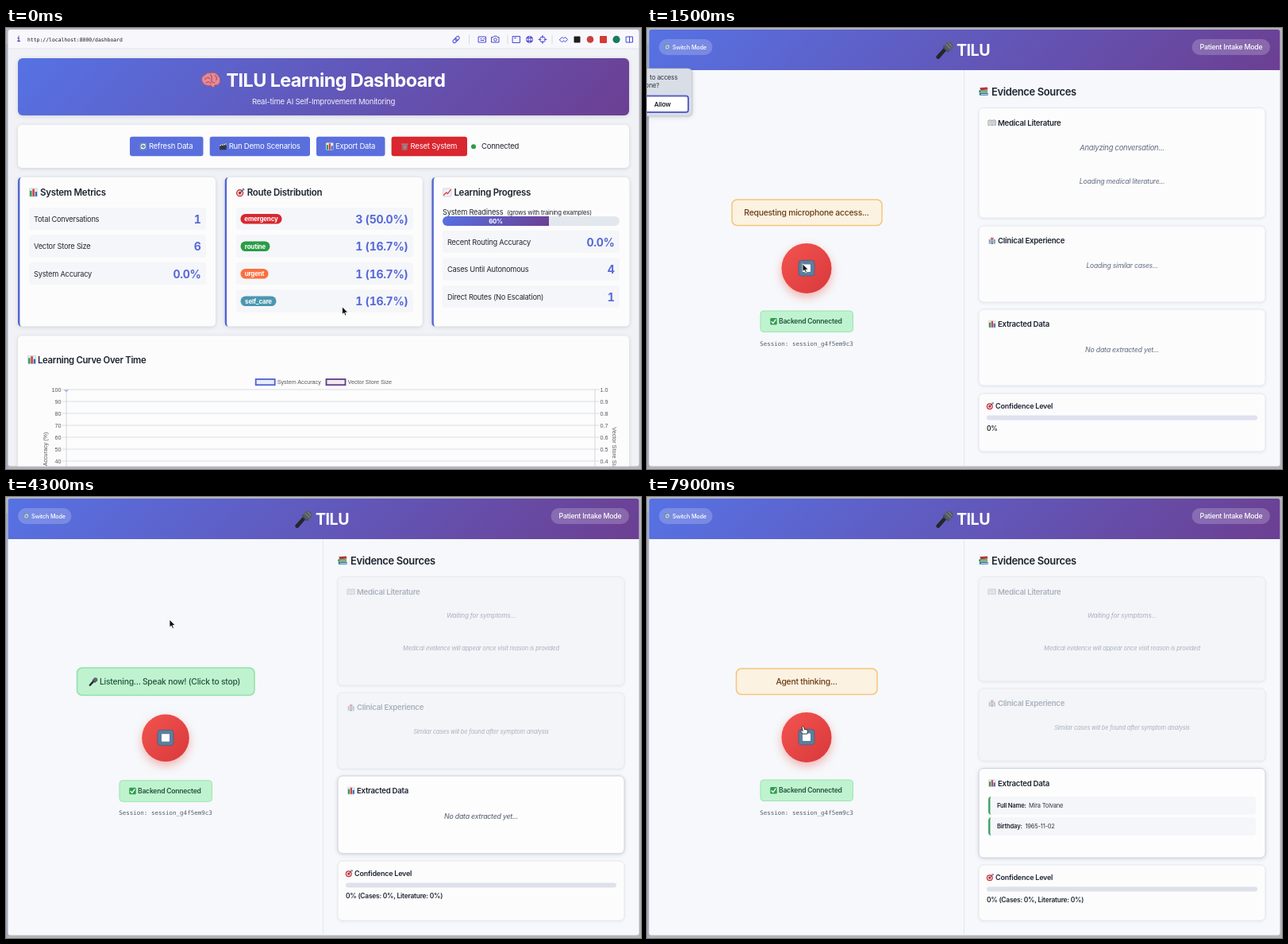
Write an HTML page that moves like this. It is 800x555 px and loops after 8000 ms.

```html
<!DOCTYPE html>
<html lang="en">
<head>
<meta charset="utf-8">
<title>Dashboard tour</title>
<style>
html, body { margin: 0; width: 100%; height: 100%; overflow: hidden; background: #b4b5ba; }
svg { display: block; width: 800px; height: 555px; }
text { font-family: Inter, sans-serif; letter-spacing: -.025em; white-space: pre; }
.chart text { font-family: "Liberation Sans", Arial, sans-serif; letter-spacing: 0; }
.mono { font-family: "DejaVu Sans Mono", monospace; letter-spacing: 0; }
.num { font-variant-numeric: tabular-nums; }
.b { font-weight: 700; }
.s { font-weight: 600; }
.m { font-weight: 500; }
.i { font-style: italic; }
.mid { text-anchor: middle; }
.end { text-anchor: end; }
.card { filter: drop-shadow(0 1.5px 2.5px rgba(30, 35, 60, .16)); }
.soft { filter: drop-shadow(0 1px 1.5px rgba(30, 35, 60, .08)); }
.glow { filter: drop-shadow(0 5px 6px rgba(235, 70, 60, .38)); }
</style>
</head>
<body>
<svg id="stage" viewBox="0 0 800 555" xmlns="http://www.w3.org/2000/svg"></svg>
<script>
const LOOP = 8000, STEP = 100, SCROLL = 599;
const INK = '#23272f', DARK = '#1d2430', BLUE = '#5569d8', MUTED = '#5f6b7d', PALE = '#a8b1bf', AXIS = '#595959';

const rect = (x, y, w, h, r, fill, more = '') =>
  `<rect x="${x}" y="${y}" width="${w}" height="${h}" rx="${r}" fill="${fill}" ${more}/>`;
const circle = (x, y, r, fill, more = '') =>
  `<circle cx="${x}" cy="${y}" r="${r}" fill="${fill}" ${more}/>`;
const path = (d, fill, stroke = 'none', width = 1) =>
  `<path d="${d}" fill="${fill}" stroke="${stroke}" stroke-width="${width}" stroke-linecap="round" stroke-linejoin="round"/>`;
// y is the middle of the capitals
const text = (x, y, str, size = 9.58, fill = INK, cls = '') =>
  `<text x="${x}" y="${y + size * .36}" font-size="${size}" fill="${fill}" class="${cls}">${str}</text>`;
// Coloured left border that tapers into the rounded corners
const edge = (x, y, h, w, r, fill) =>
  path(`M${x + r} ${y}Q${x} ${y} ${x} ${y + r}V${y + h - r}Q${x} ${y + h} ${x + r} ${y + h}` +
    `Q${x + w} ${y + h} ${x + w} ${y + h - r}V${y + r}Q${x + w} ${y} ${x + r} ${y}z`, fill);

// CSS-like 135 degree gradient across a box
function diagonal(id, x, y, w, h, from, to) {
  const cx = x + w / 2, cy = y + h / 2, d = (w + h) / 4;
  return `<linearGradient id="${id}" gradientUnits="userSpaceOnUse" x1="${cx - d}" y1="${cy - d}" x2="${cx + d}" y2="${cy + d}">
    <stop stop-color="${from}"/><stop offset="1" stop-color="${to}"/></linearGradient>`;
}

// Icons live on a 10 x 10 grid
const ICONS = {
  chart: rect(.3, .3, 9.4, 9.4, .8, '#e6ebee', 'stroke="#bcc6cc" stroke-width=".5"') + rect(1, 3, 2.2, 6.4, 0, '#2f9e4f') +
    rect(4, 1, 2.2, 8.4, 0, '#d5383c') + rect(7, 4.2, 2.2, 5.2, 0, '#2f6fc4'),
  trend: rect(.3, .3, 9.4, 9.4, .8, '#eef1f4', 'stroke="#b9c2cc" stroke-width=".5"') +
    path('M1 8L4 5L5.5 6.5L9 1.8', 'none', '#d5383c', 1.1),
  target: circle(4.5, 5.6, 4.2, '#cf2f36') + circle(4.5, 5.6, 2.9, '#f4eeee') +
    circle(4.5, 5.6, 1.7, '#cf2f36') + path('M4.5 5.6L9 1', 'none', '#35506e', 1) + path('M8 .4V2h1.7', 'none', '#5d86b8', 1),
  mic: path('M.8 9.3L5.2 4.4', 'none', '#23262c', 2.3) + path('M4.6 3.2L6.8 5.4', 'none', '#4b4f57', 1.8) +
    circle(7.3, 2.7, 2.5, '#565b62') + path('M5.8 1.8L8.2 4.2M7.2 .9L9 2.9', 'none', '#9aa0a8', .4),
  books: rect(.6, 6.8, 8.8, 2.4, .6, '#2e6fae') + rect(.2, 4, 8.6, 2.5, .6, '#358a4c') +
    path('M1 1.6L8.5 .9L9.2 3.3L1.8 3.9z', '#b5353a') + path('M2.5 8.2h6.4M2 5.4h6.2', 'none', '#e9e4d6', .7),
  book: path('M.3 2Q3 1 5 2.2Q7 1 9.7 2V8.4Q7 7.4 5 8.6Q3 7.4 .3 8.4z', '#e9e7e2', '#6d7b8d', .7) +
    path('M5 2.4V8.3M1.7 3.7h2M1.7 5.3h2M6.3 3.7h2M6.3 5.3h2', 'none', '#8b96a5', .5),
  hospital: rect(.6, 3, 8.8, 6.6, .3, '#a9b6c4') + rect(2.6, .5, 4.8, 9.1, .3, '#c9d1da') +
    path('M5 1.3v2.8M3.6 2.7h2.8', 'none', '#d5383c', 1) + rect(4, 7, 2, 2.6, 0, '#5a6c80') +
    path('M1.5 5h.5M1.5 7h.5M8 5h.5M8 7h.5M3.6 5.6h2.8', 'none', '#56718e', .9),
  check: rect(.3, .3, 9.4, 9.4, 1.5, '#2f9e4f') + path('M2.3 5.4L4.3 7.5L7.8 2.5', 'none', '#fff', 1.5),
  refresh: rect(.3, .3, 9.4, 9.4, 1.6, '#6f8fb3') + path('M2.2 5A2.8 2.8 0 0 1 7 3M7.8 5A2.8 2.8 0 0 1 3 7', 'none', '#fff', 1.1) +
    path('M7.7 1.6V4H5.3zM2.3 8.4V6H4.7z', '#fff'),
  clapper: rect(.5, 3.6, 9, 5.9, .6, '#33373f') + path('M.5 3.2L9 .8L9.5 2.4L.9 4.6z', '#e7e7e7') +
    path('M2.4 2.8l1 1M5 2.1l1 1M7.4 1.4l1 1', 'none', '#222', .9),
  bin: path('M1.5 2.4h7L7.8 9.6H2.2z', '#84656f', '#b48d96', .5) + path('M1 1.8h8M3.6 4v4M5 4v4M6.4 4v4', 'none', '#c5a3aa', .7),
  clock: circle(5, 5, 4.5, '#eceef0', 'stroke="#6d747d" stroke-width="1"') + path('M5 2.2V5H7.6', 'none', '#333', .9),
  cabinet: rect(1, .2, 8, 9.6, .5, '#4a5057') + path('M2 3.3h6M2 6.5h6', 'none', '#8c939b', .5) +
    path('M4.2 1.8h1.6M4.2 5h1.6M4.2 8.2h1.6', 'none', '#d6dade', .8),
  brain: path('M.4 5.6Q-.2 3.5 1.6 2.6Q3 .9 5 1.3Q7.4 .7 8.6 2.4Q10.4 4 9.8 6Q9.2 7.8 7.2 7.6L6.4 9L5 7.8Q1.6 8.4 .4 5.6z', '#e58b96', '#b8586a', .4) +
    path('M2 4.6Q3.2 3 4.4 4.2M4.8 2.2Q6 3 5.4 4.6T7 6.4M7.2 2.6Q8.6 3.6 7.8 5M2.6 6.4Q4 5.4 5 6.8', 'none', '#b8586a', .6)
};
const icon = (name, x, y, size) =>
  `<g transform="translate(${x} ${y - size / 2}) scale(${size / 10})">${ICONS[name]}</g>`;

const PILL = { emergency: ['#d8272f', 52], routine: ['#2a9d45', 37], urgent: ['#fb7040', 35], self_care: ['#4a98b0', 45] };
function pill(x, y, kind) {
  const [fill, w] = PILL[kind];
  return rect(x, y - 6.3, w, 12.6, 6.3, fill) + text(x + w / 2, y, kind, 8, '#fff', 'b mid');
}

const panel = (x, y, w, h) => rect(x, y, w, h, 5, '#fcfcfd', 'class="card"');
const row = (x, y, label, value) =>
  rect(x, y, 223, 28, 3, '#f5f6f9') + label + text(x + 216.5, y + 14.6, value, 14.1, BLUE, 'b num end');
const labelled = (x, y, label, value) => row(x, y, text(x + 6, y + 14.3, label, 9.25), value);

function metricCard(x, iconName, title) {
  return panel(x, 188, 249, 187.5) + edge(x, 188, 187.5, 2.4, 5, '#5064cf') +
    icon(iconName, x + 14, 207, 11) + text(x + 28, 207, title, 11.5, DARK, 's');
}

function button(x, w, iconName, label, fill = '#5a6fdd') {
  return rect(x, 136.7, w, 24.6, 3, fill) + icon(iconName, x + 12, 149, 9.5) + text(x + 24, 149, label, 9.55, '#fff');
}

function chart() {
  let out = '';
  for (let k = 0; k <= 10; k++) {
    const y = 455 + k * 15;
    out += path(`M71 ${y}H747`, 'none', '#d0d6dc', .8) +
      text(69.5, y, 100 - k * 10, 7.2, AXIS, 'end') + text(748.5, y, (1 - k / 10).toFixed(1), 7.2, AXIS);
  }
  const key = (x, stroke, fill, label) =>
    rect(x, 442, 24, 7.2, 0, fill, `stroke="${stroke}" stroke-width="1.8"`) + text(x + 27, 445.7, label, 7.2, AXIS);
  return `<g class="chart">${out}
    ${path('M76 455V610M742 455V610', 'none', '#c9ced6', .8)}
    ${path('M74 455.5Q76 459 78 455.5', '#dfe4fb', '#5064cf', .8)}
    ${key(314.7, '#4f63d2', '#e8ebfa', 'System Accuracy')}${key(403.5, '#5f3d8f', '#f2e8ee', 'Vector Store Size')}
    <g transform="translate(49 530) rotate(-90)">${text(0, 0, 'Accuracy (%)', 7.2, AXIS, 'mid')}</g>
    <g transform="translate(767 530) rotate(90)">${text(0, 0, 'Vector Store Size', 7.2, AXIS, 'mid')}</g>
    ${text(76, 633, '2025-08-10T18:25:17.294622', 7.2, AXIS, 'mid')}</g>`;
}

const CASES = [
  ['emergency', '18:25:17', 'Nadia Folkern, born March 3rd, 1985, presents with severe chest pain of sudden onset one hour ago. No regular medications, allergies, or medical conditions',
    'reported. Key symptoms include severe chest pain, indicating potential cardiac issues. Duration of symptoms is one hour. No associated symptoms mentioned. Immediate',
    'medical evaluation is warranted to assess for potential cardiac events.'],
  ['emergency', '18:47:02', "I'm having severe chest pain that started 30 minutes ago | The pain is 9/10, crushing, radiating to my left arm with shortness of breath"],
  ['routine', '18:47:03', "I'm here for my yearly physical exam | No specific symptoms, just routine preventive care"],
  ['urgent', '18:47:03', "I've had a fever of 103°F for 2 days with severe headache | The fever is 8/10 severity, started suddenly, with chills and body aches"],
  ['emergency', '18:47:03', "I suddenly can't speak clearly and my face feels droopy | Started 10 minutes ago, sudden onset, left side weakness, 10/10 concern"],
  ['self_care', '18:47:03', 'I have a runny nose and mild cough for 2 days | Symptoms are 2/10 severity, typical cold symptoms, no fever']
];
function caseBox([kind, time, first, ...rest], n) {
  const y = SCROLL + (n ? 225 + n * 51 : 202), h = n ? 47 : 69.5, last = y + h - 11.3;
  return rect(27, y, 746, h, 3, '#f5f6f9', 'stroke="#dfe3e9" stroke-width="1"') +
    text(33, y + 12, `Case ${n + 1}:`, 9.7, INK, 'b') + pill(n ? 70 : 68.5, y + 12, kind) +
    text(33, y + 24.3, 'Symptoms:', 9.7, INK, 'b') + text(88.5, y + 24.3, first) +
    rest.map((line, k) => text(33, y + 35.6 + k * 11.4, line)).join('') +
    text(33, last, 'Added:', 9.7, INK, 'b') + text(68.5, last, '10/08/2025, ' + time, 9.4);
}

function dashboard() {
  const routes = [['emergency', '3 (50.0%)'], ['routine', '1 (16.7%)'], ['urgent', '1 (16.7%)'], ['self_care', '1 (16.7%)']];
  return rect(15, 38, 770, 72, 6, 'url(#hero)', 'class="card"') + icon('brain', 246, 65.5, 24) +
    text(553.3, 65.5, 'TILU Learning Dashboard', 23.4, '#fff', 'b end') +
    text(400, 93, 'Real-time AI Self-Improvement Monitoring', 9.55, '#f1f0fa', 'mid') +
    panel(15, 122, 770, 54) +
    button(156, 92.5, 'refresh', 'Refresh Data') + button(256.7, 126.3, 'clapper', 'Run Demo Scenarios') +
    button(391, 86.5, 'chart', 'Export Data') + button(485.6, 95.4, 'bin', 'Reset System', '#d9262f') +
    circle(589, 149.3, 3, '#2a9d45') + text(599, 149, 'Connected', 9.5) +
    metricCard(15, 'chart', 'System Metrics') +
    labelled(29, 226, 'Total Conversations', '1') + labelled(29, 260.5, 'Vector Store Size', '6') + labelled(29, 295, 'System Accuracy', '0.0%') +
    metricCard(275.7, 'target', 'Route Distribution') +
    routes.map(([kind, value], k) => row(290, 226 + k * 34.5, pill(295.5, 240.2 + k * 34.5, kind), value)).join('') +
    metricCard(536.4, 'trend', 'Learning Progress') +
    text(550, 231.7, 'System Readiness', 9.25) + text(631.3, 232, '(grows with training examples)', 7.75) +
    rect(550, 237, 223, 12, 6, '#e3e8ee') + path('M556 237H684V249H556A6 6 0 0 1 556 237z', 'url(#bar)') +
    text(617, 243, '60%', 7.8, '#fff', 'b mid') +
    labelled(550, 255, 'Recent Routing Accuracy', '0.0%') + labelled(550, 289.5, 'Cases Until Autonomous', '4') + labelled(550, 324, 'Direct Routes (No Escalation)', '1') +
    panel(15, 387.5, 770, 264.5) + icon('chart', 27, 417.5, 11) + text(40, 417.5, 'Learning Curve Over Time', 11.3, DARK, 's') + chart() +
    panel(15, 664, 770, 88) + icon('clock', 27, 694, 10.5) + text(40, 694, 'Recent Activity', 11.3, DARK, 's') +
    rect(27, 713, 746, 23.5, 2, '#f5f6f9') + rect(27, 713, 2, 23.5, 1, '#5064cf') +
    pill(34, 724.7, 'emergency') + text(89, 724.5, 'Escalation: Agent predicted emergency') + text(767.5, 725, '18:25:17', 7.7, MUTED, 'end') +
    panel(15, 752, 770, 389) + icon('cabinet', 27, 782, 11) + text(40, 782, 'Vector Store Contents', 11.3, DARK, 's') +
    CASES.map(caseBox).join('');
}

function toolbar() {
  const c = '#4646cf', line = (d) => path(d, 'none', c, 1);
  return rect(3, 2.5, 794, 24, 3, '#f8f8fc') + path('M3 26H797', 'none', '#dcdce6', .8) +
    text(16, 14.2, 'i', 8, '#3a3ab0', 'mono b mid') + text(27, 14.2, 'http://localhost:8000/dashboard', 6.43, '#14141c', 'mono') +
    path('M583.5 9V20M632 9V20M688 9V20', 'none', '#cfcfdc', .8) +
    `<g transform="rotate(-45 567 14.5)">${rect(562, 12.6, 6, 4, 2, 'none', `stroke="${c}"`)}${rect(566, 12.6, 6, 4, 2, 'none', `stroke="${c}"`)}</g>` +
    line('M595.5 11h9v7h-9zM598 13.5h1M602 13.5h1M598 15.5h4M612 11.5h2l1-1.3h3l1 1.3h2v6.5h-9z') + circle(616.5, 14.6, 1.8, 'none', `stroke="${c}"`) +
    line('M638.5 10.5h9v8h-9zM640.5 12.5h2') +
    circle(659.5, 14.4, 4, 'none', `stroke="${c}"`) + line('M656 12.5h7M656 16.5h7M658 10.6v7.6M661 10.6v7.6') +
    circle(676, 14.4, 3.5, 'none', `stroke="${c}"`) + line('M676 9.5v3M676 16.5v3M671 14.4h3M678 14.4h3') +
    line('M697.5 14.5l3-3l2 1.6l2-1.6l3 3l-3 3l-2-1.6l-2 1.6z') +
    rect(715.5, 10.5, 8, 8, 1, '#1d1d20') + circle(736, 14.4, 4.3, '#c8403f') + rect(748, 10, 9, 9, 1, '#d43a36') + circle(769, 14.4, 4.6, '#157a62') +
    line('M781.5 11h8v7h-8zM785.5 11v7');
}

// Edges: card 1 bottom, card 2 top and bottom, card 3 top and bottom, card 4 top
const LAYOUTS = {
  loading: [239, 249, 345, 354, 450, 460],
  empty: [237, 246.3, 342, 351, 448.7, 458],
  one: [238.5, 248, 345, 354.3, 447, 456.5],
  two: [232, 241, 332, 341.5, 454, 463]
};
const FIELDS = [['Full Name:', 'Mira Tolvane', 481], ['Birthday:', '1965-11-02', 476.5]];

function evidence(name) {
  const [aEnd, b, bEnd, c, cEnd, d] = LAYOUTS[name], busy = name === 'loading';
  const fade = busy ? DARK : PALE;
  const box = (y, end, fill, stroke, cls) => rect(418, y, 361, end - y, 6, fill, `stroke="${stroke}" stroke-width="1" class="${cls}"`);
  const head = (y, iconName, title, fill, dim) =>
    `<g opacity="${dim ? .5 : 1}">${icon(iconName, 430, y + 18.6, 9.5)}</g>` + text(442, y + 18.6, title, 9.6, fill, 's');
  const note = (y, str, size, fill) => text(598.5, y, str, size, fill, 'i mid');
  const side = (y, end) => busy ? box(y, end, '#fcfcfd', '#e4e8ef', 'soft') : box(y, end, '#f4f5f8', '#e7eaef', 'soft');
  const count = { one: 1, two: 2 }[name] || 0;
  const fields = FIELDS.slice(0, count).map(([label, value, x], k) => {
    const y = c + 35.5 + k * 26.3;
    return rect(430, y, 337, 22.7, 4, '#f5f6f9') + edge(430, y, 22.7, 2.4, 4, '#3ba565') +
      text(441, y + 11.4, label, 7.6, DARK, 's') + text(x, y + 11.4, value, 7.5, '#2d3644');
  }).join('');
  return side(100.5, aEnd) + head(100.5, 'book', 'Medical Literature', fade, !busy) +
    (busy ? note(150.5, 'Analyzing conversation...', 9.4, MUTED) + note(193.3, 'Loading medical literature...', 8.6, MUTED)
      : note(149.5, 'Waiting for symptoms...', 8.2, PALE) + note(190.3, 'Medical evidence will appear once visit reason is provided', 7.5, PALE)) +
    side(b, bEnd) + head(b, 'hospital', 'Clinical Experience', fade, !busy) +
    (busy ? note(b + 50, 'Loading similar cases...', 8.5, MUTED) : note(b + 49.3, 'Similar cases will be found after symptom analysis', 7.5, PALE)) +
    (busy ? box(c, cEnd, '#fcfcfd', '#e4e8ef', 'soft') : box(c, cEnd, '#fdfdfe', '#cbd3df', 'card')) +
    head(c, 'chart', 'Extracted Data', DARK) +
    (count ? fields : note(c + 50.4, 'No data extracted yet...', 8.8, busy ? MUTED : '#4d596b')) +
    box(d, 533, '#fcfcfd', '#e4e8ef', 'soft') + icon('target', 427.5, d + 15.6, 9.5) +
    text(439, d + 15.6, 'Confidence Level', 9, DARK, 's') + rect(428, d + 27.6, 341, 6, 3, busy ? '#dfe1ef' : '#dde2ea') +
    text(428, d + 43.6, busy ? '0%' : '0% (Cases: 0%, Literature: 0%)', 8.4, DARK, 's');
}

const STATUS = {
  request: [107, 189, 'Requesting microphone access...'],
  listen: [89.5, 223.5, 'Listening... Speak now! (Click to stop)'],
  process: [112.5, 177.5, 'Processing your response...'],
  think: [112.5, 177.5, 'Agent thinking...']
};

function controls(state, hover) {
  const [x, w, str] = STATUS[state], live = state === 'listen', dy = live ? 1 : 0;
  const y = 216 - dy, h = 32.5 + 2 * dy, r = hover ? 31.5 : 29.8, cy = 302.4 + dy * .8;
  return rect(x, y, w, h, 6.5, live ? '#bff3cf' : '#fcf2e1', `stroke="${live ? '#92dfab' : '#f5c57c'}" stroke-width="1.5"`) +
    (live ? icon('mic', 105, 232.3, 10.5) + text(118, 232.3, str, 10.4, '#24543d', 'm') : text(201, 232.4, str, 10.4, '#6a3a14', 'm mid')) +
    circle(201, cy, r, 'url(#stop)', 'class="glow"') +
    rect(191, cy - 10, 20, 19.5, 3.5, '#5b7f9f', 'stroke="#44617d" stroke-width=".8"') + rect(196, cy - 5, 10, 9.5, .8, '#fff') +
    rect(143, 356 + dy * .8, 116.5, 26.5, 4, '#bff3cf', 'stroke="#9be3b2" stroke-width="1"') +
    icon('check', 155, 369.3 + dy * .8, 9) + text(166, 369.3 + dy * .8, 'Backend Connected', 8.55, '#24543d', 's') +
    text(201, 397 + dy * .6, 'Session: session_g4f5em9c3', 7.53, '#56606e', 'mono mid');
}

const APP = rect(2.5, 2, 795, 549.5, 3, '#f6f8fb') + path('M399.5 53V551', 'none', '#e3e7ee', 1) +
  path('M2.5 53V5Q2.5 2 5.5 2H794.5Q797.5 2 797.5 5V53z', 'url(#top)') +
  rect(15, 14, 67.5, 20, 10, '#fff', 'opacity=".2"') + icon('refresh', 22, 24, 7.5) + text(32, 24, 'Switch Mode', 7.2, '#fff', 'm') +
  icon('mic', 365, 27.5, 21) + text(390, 28, 'TILU', 19.6, '#fff', 'b') +
  rect(686.5, 14, 98.5, 20, 10, '#fff', 'opacity=".2"') + text(736, 24, 'Patient Intake Mode', 8.75, '#fff', 'm mid') +
  icon('books', 418, 79.5, 12.5) + text(434, 80, 'Evidence Sources', 12.9, DARK, 's');

const POPUP = path('M0 51H51Q57 51 57 57V105Q57 111 51 111H0z', '#d9dde6', '#b9bdc9', .7) +
  text(38.5, 62, 'to access', 8.1, '#30343c', 'end') + text(15.5, 72, 'phone?', 8.1, '#30343c', 'end') +
  rect(-20, 85.5, 72, 20.5, 3, '#fff', 'stroke="#5c62c6" stroke-width="2"') + text(9, 96, 'Allow', 8.2, '#22252c', 's');

const ARROW = path('M0 0V9.6L2.3 7.6L3.8 11L5.4 10.3L4 7H7z', '#111', '#fff', .8);
const HAND = path('M-1.2 .8Q0 -.8 1.1 .8L1.8 3.8L4.6 4.2Q6.2 4.6 6 6.4L5.4 9.6H-.4L-3 6.2Q-3.2 5 -1.6 5.2L-.6 5.8z', '#fff', '#222', .9);

const stage = document.getElementById('stage');
stage.innerHTML = `<defs>
  ${diagonal('hero', 15, 38, 770, 72, '#5672e4', '#6c3f92')}${diagonal('top', 3, 2, 794, 51, '#5672e4', '#6c3f92')}
  ${diagonal('bar', 550, 237, 134, 12, '#5672e4', '#6c3f92')}${diagonal('stop', 170, 271, 62, 62, '#f3544f', '#d9383b')}
  <clipPath id="view"><rect x="2.5" y="26.4" width="795" height="525.1"/></clipPath></defs>
  <rect width="800" height="555" fill="#b4b5ba"/><rect y="20" width="2.5" height="535" fill="#a3a9bd"/>
  <g id="dash">${rect(2.5, 2, 795, 549.5, 3, '#f1f2f6')}
    <g clip-path="url(#view)"><g id="page">${dashboard()}</g><rect id="thumb" x="791.5" width="4.5" height="246" rx="2.2" fill="#737378"/></g>${toolbar()}</g>
  <g id="app">${APP}<g id="evidence"></g><g id="controls"></g><g id="popup" class="card">${POPUP}</g></g>
  <g id="cursor"><g id="arrow">${ARROW}</g><g id="hand">${HAND}</g></g>`;

const $ = id => document.getElementById(id);
const show = (id, on) => $(id).setAttribute('display', on ? 'inline' : 'none');
const move = (id, x, y) => $(id).setAttribute('transform', `translate(${x} ${y})`);
const ease = u => u * u * (3 - 2 * u);
const ramp = (t, a, b) => ease(Math.min(1, Math.max(0, (t - a) / (b - a))));
const at = (list, t) => list.reduce((now, [start, value]) => t >= start ? value : now, list[0][1]);

const STATES = [[0, 'request'], [2100, 'listen'], [4900, 'process'], [5700, 'think'], [6000, 'listen'], [6500, 'process'], [7800, 'think']];
const DATA = [[0, 'loading'], [2100, 'empty'], [5300, 'one'], [6800, 'two']];
// start, end, x, y
const MOVES = [[300, 800, 195, 260], [1050, 1300, 196, 297], [2000, 2600, 206, 154.5], [4300, 4800, 196.5, 288.5]];

const drawn = {};
function fill(id, key, make) {
  if (drawn[id] === key) return;
  drawn[id] = key;
  $(id).innerHTML = make();
}

function draw(t) {
  let x = 423.5, y = 351;
  for (const [a, b, tx, ty] of MOVES) {
    const u = ramp(t, a, b);
    x += (tx - x) * u;
    y += (ty - y) * u;
  }
  const inApp = t >= 1200, hand = t >= 4700;
  show('dash', !inApp);
  show('app', inApp);
  show('popup', t < 1700);
  show('arrow', !hand);
  show('hand', hand);
  move('cursor', x, y);

  const scrolled = ramp(t, 150, 950);
  move('page', 0, -SCROLL * scrolled);
  $('thumb').setAttribute('y', 28 + 275 * scrolled);
  show('thumb', scrolled > 0);

  const state = at(STATES, t), data = at(DATA, t);
  const hover = Math.hypot(x - 201, y - 302.5) < 31;
  fill('evidence', data, () => evidence(data));
  fill('controls', state + hover, () => controls(state, hover));
}

const start = performance.now();
function tick() {
  const t = (performance.now() - start) % LOOP;
  draw(Math.floor(t / STEP) * STEP);
  requestAnimationFrame(tick);
}
tick();
</script>
</body>
</html>
```
